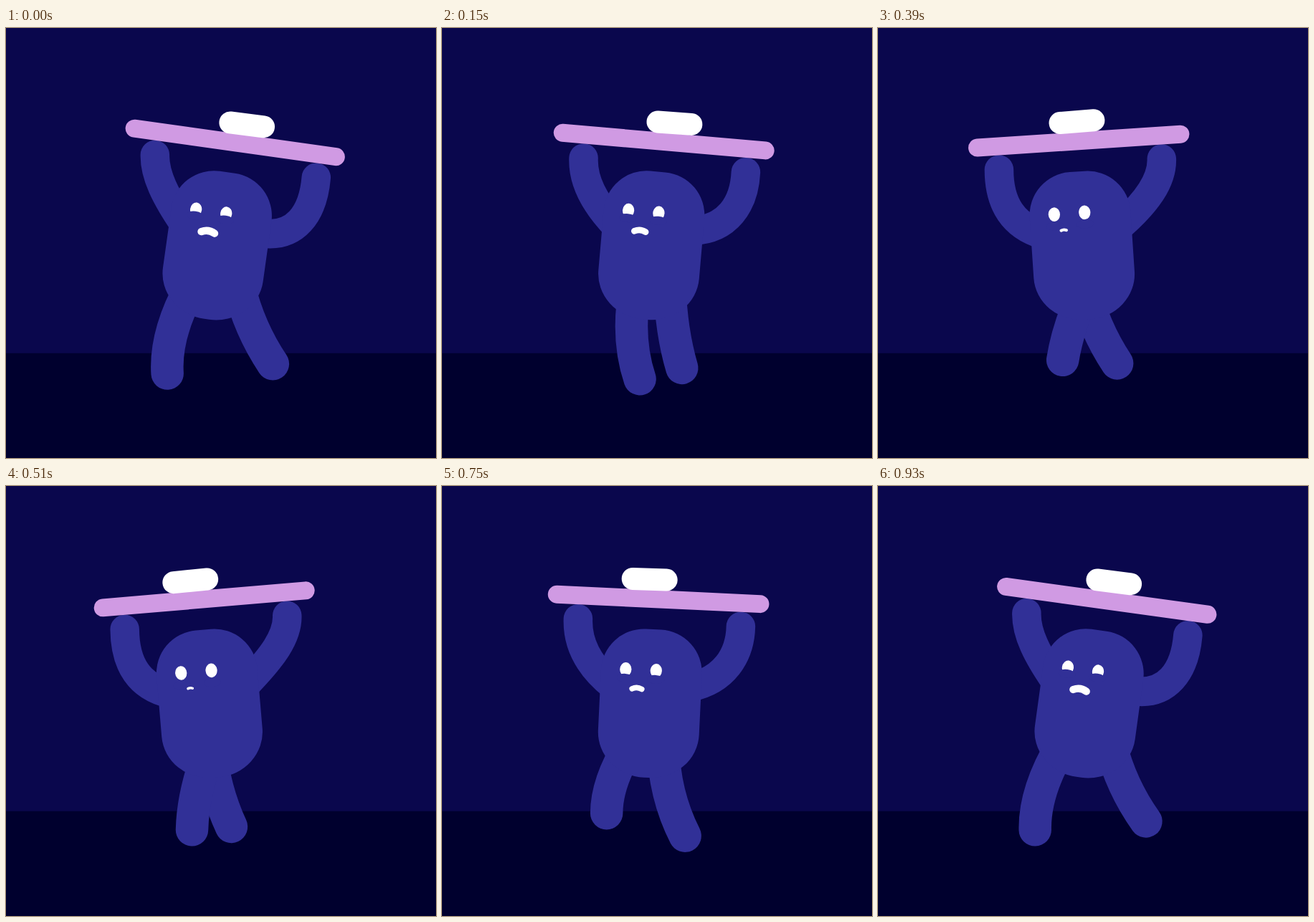
Write an HTML page that moves like this. It is 600 by 600 pixels and loops after 0.96 s.

```html
<!DOCTYPE html>
<html lang="en">
<head>
<meta charset="utf-8">
<title>Balancing walk</title>
<style>
  html, body { margin: 0; width: 100%; height: 100%; overflow: hidden; background: #0a074d; }
  svg { display: block; width: 100%; height: 100%; }
  .limb { fill: none; stroke: #313097; stroke-linecap: round; }
  .skin { fill: #313097; }
  .white { fill: #fff; }
</style>
</head>
<body>
<svg viewBox="0 0 600 600">
  <rect width="600" height="600" fill="#0a074d"/>
  <rect y="453.7" width="600" height="147" fill="#00002e"/>
  <path id="legA" class="limb" stroke-width="45.5"/>
  <path id="legB" class="limb" stroke-width="45.5"/>
  <g id="upper">
    <path id="armL" class="limb" stroke-width="40.5"/>
    <path id="armR" class="limb" stroke-width="40.5"/>
    <path class="skin" d="M217.5 260a60 60 0 0 1 60-60h21a60 60 0 0 1 60 60v84a67 63 0 0 1-67 63h-7a67 63 0 0 1-67-63z"/>
    <g class="white">
      <ellipse cx="251.9" cy="257.5" rx="8.1" ry="9.8"/>
      <ellipse cx="294.4" cy="257.5" rx="8.1" ry="9.8"/>
    </g>
    <g id="cheeks" class="skin">
      <ellipse cx="251.9" cy="6" rx="12" ry="6"/>
      <ellipse cx="294.4" cy="6" rx="12" ry="6"/>
    </g>
    <path id="mouth" d="M-9.2 .8Q0-4.2 9.2 .8" fill="none" stroke="#fff" stroke-width="10.2" stroke-linecap="round"/>
    <path d="M151 157.5H435" stroke="#d09ae3" stroke-width="25" stroke-linecap="round"/>
    <rect id="box" class="white" x="-39" y="-15.5" width="78" height="31" rx="15.5"/>
  </g>
</svg>
<script>
const LOOP = 960, HALF = LOOP / 2, STEP = 30, HIP_Y = 360, STRIDE = 60;
const $ = id => document.getElementById(id);
const set = (id, name, value) => $(id).setAttribute(name, value);
const cos = deg => Math.cos(deg * Math.PI / 180);

// Each joint swings as [centre x, reach, lag in degrees]
const LEGS = {
  legA: { lead: 96, foot: 273.7, knee: [258.5, 43, 5], hip: [272, 15, 10] },
  legB: { lead: -444, foot: 314, knee: [299.5, 40, 10], hip: [306, 19, 18] }
};
const swingX = ([x, reach, lag], phase) => x - reach * cos(phase - lag);

// The foot presses down in the forward half and lifts in the return
const footY = phase => 474.2 + 11.7 * cos(phase - 100)
  + 6.7 * cos(2 * phase - 130) + 4 * cos(3 * phase - 6);

function drawLeg(id, t) {
  const { lead, foot, knee, hip } = LEGS[id];
  const phase = (t + lead) / LOOP * 360;
  const x = swingX([foot, STRIDE, 0], phase), y = footY(phase);
  const kneeY = HIP_Y + 0.55 * (y - HIP_Y);
  set(id, 'd', `M${swingX(hip, phase)} ${HIP_Y}Q${swingX(knee, phase)} ${kneeY} ${x} ${y}`);
}

function draw(t) {
  const back = t >= HALF;
  const s = (t % HALF) / HALF;
  const ease = s * s * (3 - 2 * s);
  const tilt = back ? -5 + 13 * ease : 8 - 13 * ease;
  const slide = 30 * s ** 3.75;
  const boxX = 288.6 + (back ? -12.8 + slide : 17.2 - slide);

  Object.keys(LEGS).forEach(id => drawLeg(id, t));

  set('upper', 'transform', `rotate(${tilt} 289 350)`);
  set('armL', 'd', `M${181 + 0.45 * tilt} 190
    C${179.8 + tilt} ${232 - 1.75 * tilt} ${198.8 + 1.1 * tilt} ${262 - 2 * tilt} ${235 + 0.25 * tilt} ${282.5 - 0.5 * tilt}`);
  set('armR', 'd', `M${408.3 + 0.43 * tilt} 190
    C${408.5 + 0.75 * tilt} ${228 + 1.6 * tilt} ${384.5 + 1.25 * tilt} ${259.5 + 2.4 * tilt} 345 277.5`);
  set('cheeks', 'transform', `translate(0 ${265.3 - 0.65 * tilt})`);
  set('mouth', 'transform',
    `translate(${266.7 + 0.77 * tilt} ${282.2 + 0.5 * tilt}) scale(${(17 + 1.5 * tilt) / 28.5})`);
  set('box', 'transform', `translate(${boxX} 130.4) rotate(-0.8)`);
}

const start = performance.now();
function tick() {
  const elapsed = performance.now() - start;
  draw(Math.floor(elapsed / STEP) * STEP % LOOP);
  requestAnimationFrame(tick);
}
tick();
</script>
</body>
</html>
```
